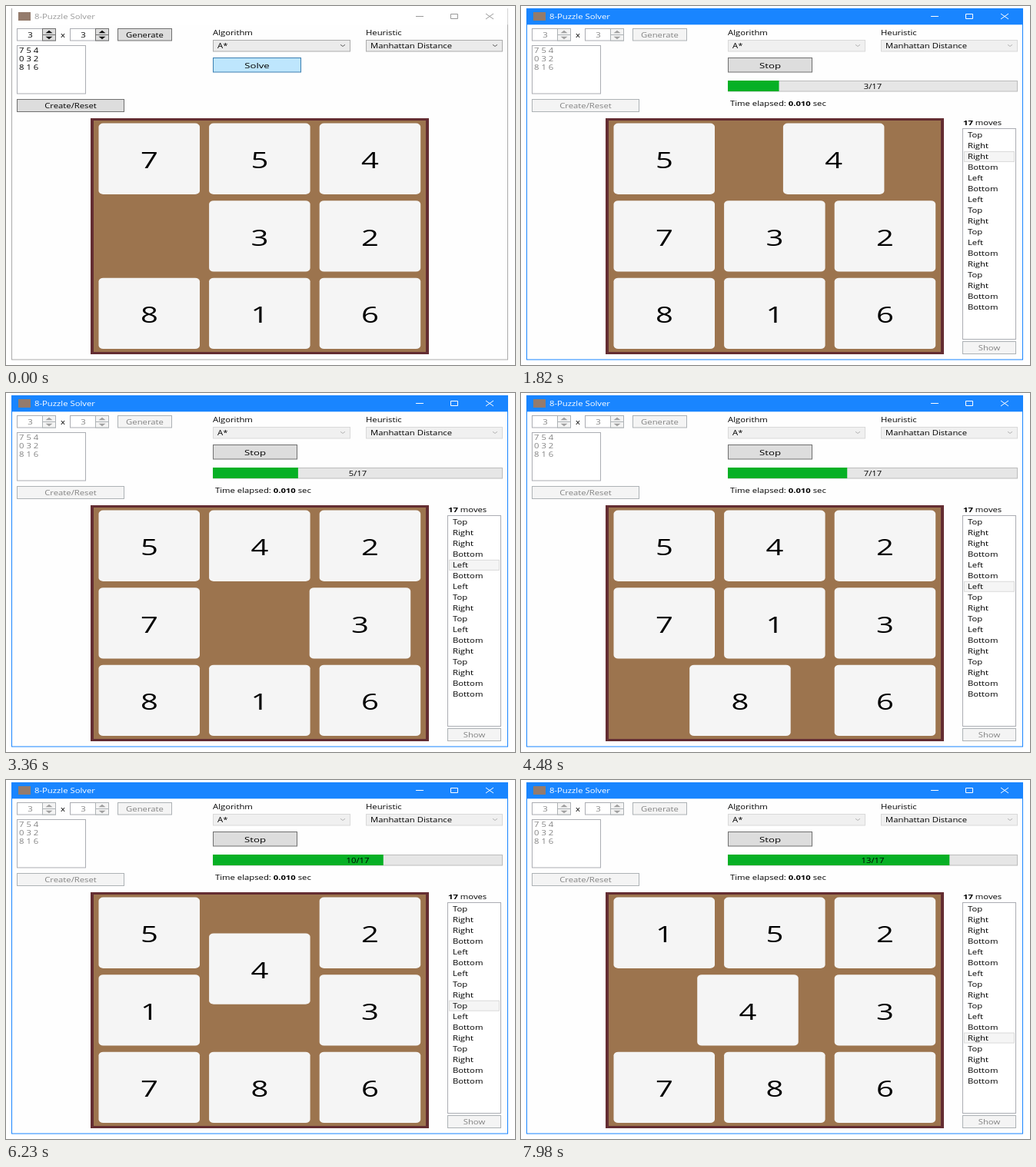
Write an HTML page that moves like this. It is 662 by 467 pixels and loops after 8000 ms.

```html
<!DOCTYPE html>
<html lang="en">
<head>
<meta charset="utf-8">
<title>8-Puzzle Solver</title>
<style>
  html, body { margin: 0; width: 100%; height: 100%; overflow: hidden; background: #fff; }
  svg { display: block; }
  text { font-family: "Open Sans", "Noto Sans", sans-serif; font-size: 11.3px; fill: #000; white-space: pre; }
  .big { font-size: 13.2px; }
  .digit { font-size: 40px; }
  .bold { font-weight: 700; }
  .button { fill: #ddd; stroke: #707070; }
  .field { fill: #fff; stroke: #abadb3; }
  .combo { fill: #ebebeb; stroke: #acacac; }
  .arrow { fill: #111; }
  .chevron { fill: none; stroke: #606060; }
  .solve { fill: #bee6fd; stroke: #3c7fb1; }
  .frame { fill: #fefefe; stroke: #aaa; }
  .bar { fill: #fff; }
  .caption { fill: #999; }
  .glyph { fill: none; stroke: #999; }
  .off { fill: #f4f4f4; stroke: #adb2b5; }
  .offText { fill: #838383; }

  .active .frame { stroke: #1985ff; }
  .active .bar { fill: #1985ff; }
  .active .caption { fill: #fff; }
  .active .glyph { stroke: #fff; }

  .busy .input .button { fill: #f4f4f4; stroke: #adb2b5; }
  .busy .input text { fill: #838383; }
  .busy .input .arrow { fill: #a0a0a0; }
  .busy .combo { fill: #f0f0f0; stroke: #d9d9d9; }
  .busy .chevron { stroke: #b4b4b4; }
  .busy .idle, svg:not(.busy) .running { display: none; }
</style>
</head>
<body>
<svg id="stage" width="662" height="467" viewBox="0 0 662 467"></svg>
<script>
const LOOP = 8000, TICK = 70, STEP = 630;
const ACTIVATE = 70, SOLVE = 140;
const COLS = 3;
const START = [7, 5, 4, 0, 3, 2, 8, 1, 6];
const MOVES = ('Top Right Right Bottom Left Bottom Left Top Right ' +
  'Top Left Bottom Right Top Right Bottom Bottom').split(' ');
const OFFSET = { Top: -COLS, Bottom: COLS, Left: -1, Right: 1 };
const FLATTEN = 0.73; // the whole window is squashed vertically

const stage = document.getElementById('stage');

function add(parent, tag, attrs = {}) {
  const node = document.createElementNS('http://www.w3.org/2000/svg', tag);
  for (const [key, value] of Object.entries(attrs)) node.setAttribute(key, value);
  return parent.appendChild(node);
}
const group = (cls, parent = stage) => add(parent, 'g', { class: cls });

function rect(parent, x, y, width, height, attrs) {
  return add(parent, 'rect', { x, y, width, height, ...attrs });
}

function label(parent, x, y, content, cls = '', anchor = 'start') {
  const node = add(parent, 'text', {
    transform: `translate(${x} ${y}) scale(1 ${FLATTEN})`, class: cls, 'text-anchor': anchor
  });
  node.textContent = content;
  return node;
}

function span(node, content, cls = '') {
  add(node, 'tspan', { class: cls }).textContent = content;
}

function button(parent, x, y, w, h, content, cls = 'button', textClass = '') {
  rect(parent, x, y, w, h, { class: cls });
  label(parent, x + w / 2, y + h / 2 + (textClass === 'big' ? 4 : 3.3), content, textClass, 'middle');
}

function spinner(parent, x) {
  rect(parent, x, 29.5, 50, 15.5, { class: 'field' });
  label(parent, x + 17, 41, '3', '', 'middle');
  rect(parent, x + 33, 29.5, 17, 8, { class: 'button' });
  rect(parent, x + 33, 37.5, 17, 7.5, { class: 'button' });
  add(parent, 'path', {
    class: 'arrow',
    d: `M${x + 37} 35.3l4.5-3.5 4.5 3.5zM${x + 37} 39.7l4.5 3.5 4.5-3.5z`
  });
}

function combo(x, w, title, value) {
  label(stage, x - 0.5, 38, title);
  rect(stage, x, 44.5, w, 14.5, { class: 'combo' });
  label(stage, x + 5.5, 55.3, value);
  add(stage, 'path', { class: 'chevron', d: `M${x + w - 12.5} 50.3l3 2.2 3-2.2` });
}

function drawWindow() {
  rect(stage, 7.5, 3.5, 645, 456.5, { class: 'frame' });
  rect(stage, 8, 3, 644.5, 21.3, { class: 'bar' });
  rect(stage, 16, 8, 16, 11, { fill: '#947b6c' });
  label(stage, 37, 17.3, '8-Puzzle Solver', 'caption');
  add(stage, 'path', {
    class: 'glyph', d: 'M533 13.5h10M578.5 10.5h9v6h-9zM624 10l10 7M634 10l-10 7'
  });
}

function drawInputs() {
  const input = group('input');
  spinner(input, 14.5);
  label(input, 74, 41, 'x', '', 'middle').style.fill = '#000';
  spinner(input, 83.5);
  button(input, 145.5, 29.5, 70, 15.5, 'Generate');
  rect(input, 14.5, 51.5, 89, 62.5, { class: 'field' });
  for (let row = 0; row < 3; row++) {
    label(input, 17, 61 + row * 11.2, START.slice(row * COLS, row * COLS + COLS).join(' '));
  }
  button(input, 14.5, 121.5, 139, 16, 'Create/Reset');
  combo(269.5, 178, 'Algorithm', 'A*');
  combo(468.5, 177, 'Heuristic', 'Manhattan Distance');
  button(group('idle'), 269.5, 67.5, 114, 18.5, 'Solve', 'solve', 'big');
}

function drawResults() {
  const running = group('running');
  button(running, 269.5, 67.5, 109, 18.5, 'Stop', 'button', 'big');
  rect(running, 269.5, 97.5, 376, 13.5, { fill: '#e6e6e6', stroke: '#bcbcbc' });
  const progress = rect(running, 269, 97, 0, 14, { fill: '#06b025' });
  const count = label(running, 457.5, 108, '', '', 'middle');

  const time = label(running, 272, 130, '');
  span(time, 'Time elapsed: ');
  span(time, '0.010', 'bold');
  span(time, ' sec');

  const total = label(running, 575, 155, '');
  span(total, String(MOVES.length), 'bold');
  span(total, ' moves');

  rect(running, 574.5, 159.5, 69, 274, { class: 'field' });
  const selected = rect(running, 576.5, 0, 65, 13, { fill: '#f5f5f5', stroke: '#dadada' });
  MOVES.forEach((move, i) => label(running, 581, 171.2 + i * 13.96, move));
  button(running, 574.5, 436.5, 69, 16, 'Show', 'off', 'offText');
  return { progress, count, selected };
}

function drawBoard() {
  rect(stage, 110, 146, 440, 307, { fill: '#642d32' });
  rect(stage, 114, 149, 432, 301, { fill: '#9c744e' });
  return START.map((_, number) => {
    if (!number) return null;
    const tile = group('tile');
    rect(tile, 0, 0, 131.5, 92.3, { rx: 6, ry: 4.5, fill: '#f5f5f5' });
    label(tile, 65.8, 58.3, number, 'digit', 'middle');
    return tile;
  });
}

// boards[k] is the layout after k moves.
const boards = [START];
for (const move of MOVES) {
  const board = [...boards.at(-1)];
  const blank = board.indexOf(0), next = blank + OFFSET[move];
  [board[blank], board[next]] = [board[next], 0];
  boards.push(board);
}

const stepStart = k => k === 1 ? 245 : k === 2 ? 877 : 1527 + (k - 3) * STEP;
const mix = (a, b, p) => a + (b - a) * p;
const cellX = cell => 120.5 + (cell % COLS) * 143.6;
const cellY = cell => 152.6 + Math.floor(cell / COLS) * 100.6;

drawWindow();
drawInputs();
const { progress, count, selected } = drawResults();
const tiles = drawBoard();

function render(time) {
  const t = Math.floor(time / TICK) * TICK;
  stage.classList.toggle('active', t >= ACTIVATE);
  stage.classList.toggle('busy', t >= SOLVE);

  let step = 0;
  while (step < MOVES.length && t >= stepStart(step + 1)) step++;
  const part = step ? (t - stepStart(step)) / (stepStart(step + 1) - stepStart(step)) : 0;
  const from = boards[Math.max(0, step - 1)], to = boards[step];

  tiles.forEach((tile, number) => {
    if (!tile) return;
    const a = from.indexOf(number), b = to.indexOf(number);
    const x = mix(cellX(a), cellX(b), part), y = mix(cellY(a), cellY(b), part);
    tile.setAttribute('transform', `translate(${x} ${y})`);
  });

  progress.setAttribute('width', 377 * step / MOVES.length);
  count.textContent = `${step}/${MOVES.length}`;
  selected.setAttribute('visibility', step ? 'inherit' : 'hidden');
  selected.setAttribute('y', 161.5 + (step - 1) * 13.96);
}

const began = performance.now();
function loop() {
  render((performance.now() - began) % LOOP);
  requestAnimationFrame(loop);
}
loop();
</script>
</body>
</html>
```
